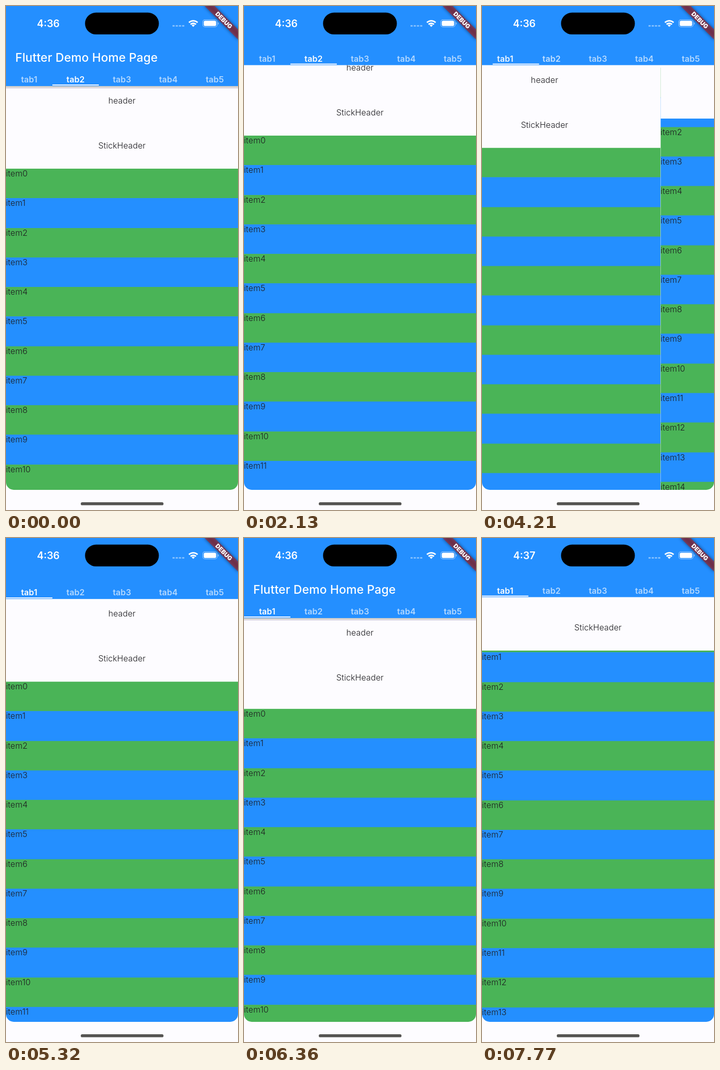
Write an HTML page that moves like this. It is 450 px wide and 976 px high and loops after 7800 ms.

```html
<!DOCTYPE html>
<html lang="en">
<head>
<meta charset="utf-8">
<title>Sticky header tabs</title>
<style>
/* --a, --b: scroll of first and second tab page; --p: page swipe from tab2 (0) to tab1 (1) */
@property --a { syntax: "<number>"; inherits: true; initial-value: 40.5; }
@property --b { syntax: "<number>"; inherits: true; initial-value: 0; }
@property --p { syntax: "<number>"; inherits: true; initial-value: 0; }

html, body { margin: 0; width: 100%; height: 100%; overflow: hidden; background: #fdfcff; }
.stage {
  --c: clamp(0, min(var(--a), var(--b)), 40.5);
  position: relative; width: 450px; height: 976px; overflow: hidden;
  background: #fdfcff; color: #1c1b1f;
  font: 300 16px/18px Inter, sans-serif; letter-spacing: .1px;
  animation: scroll-a 7.8s infinite, scroll-b 7.8s infinite, swipe 7.8s infinite;
}
.stage div, .stage svg { position: absolute; }

@keyframes scroll-b {
  0%, 19.35% { --b: 0; animation-timing-function: cubic-bezier(.44, 0, .6, 1); }
  38.718%, 100% { --b: 195.5; }
}
@keyframes swipe {
  0%, 50.9% { --p: 0; animation-timing-function: cubic-bezier(.3, .1, .3, 1); }
  57.051%, 100% { --p: 1; }
}
@keyframes scroll-a {
  0% { --a: 40.5; animation-timing-function: step-end; }
  68.205% { --a: 37; animation-timing-function: cubic-bezier(.25, .25, .6, 1); }
  75.897% { --a: -46; animation-timing-function: cubic-bezier(.42, 0, .7, .45); }
  81.538% { --a: -16; animation-timing-function: linear; }
  87.564% { --a: 44; animation-timing-function: cubic-bezier(.3, .34, .7, .9); }
  99.615%, 100% { --a: 150.8; }
}

.view { left: 0; top: 0; width: 450px; height: 937px; overflow: hidden; border-radius: 0 0 15px 15px; }
.page { left: 0; top: 0; width: 450px; height: 937px; overflow: hidden; text-align: center; }
.one { --o: var(--a); transform: translateX(calc((var(--p) - 1) * 450px)); }
.two { --o: var(--b); transform: translateX(calc(var(--p) * 450px)); }
.head { top: 174px; width: 450px; transform: translateY(calc(max(0, var(--o)) * -1px)); }
.stick {
  top: 211px; width: 450px; height: 104px; background: #fdfcff; line-height: 118px;
  transform: translateY(calc(clamp(0, var(--o), 97) * -1px));
}
.list { top: 315px; width: 450px; text-align: left; transform: translateY(calc(var(--o) * -1px)); }
/* rows overlap slightly so that no gap shows at fractional offsets */
.item { top: calc(var(--i) * 57.27px); width: 450px; height: 59px; background: #248fff; }
.item:nth-child(odd) { background: #4ab457; }

.bar {
  left: 0; top: -45px; width: 450px; height: 199.6px; background: #248fff;
  transform: translateY(calc(var(--c) * -1px));
}
.shade {
  top: 199.6px; width: 450px; height: 5.4px; opacity: calc(1 - var(--c) / 2);
  background: linear-gradient(#c3c6c8, #dcd7d2 45%, #e4e0f2);
}
.title {
  left: 18px; top: 130px; white-space: nowrap; color: #fff;
  font-size: 22.9px; line-height: 30px; font-weight: 500; letter-spacing: .16px;
  opacity: calc(1 - var(--c) / 32);
}
.tab {
  left: calc(var(--i) * 90px); top: 178px; width: 90px; text-align: center;
  font-weight: 600; color: rgb(255 255 255 / calc(.66 + .34 * var(--on, 0)));
}
.tab.first { --on: var(--p); }
.tab.second { --on: calc(1 - var(--p)); }
.mark {
  left: 90px; top: 197px; width: 90px; height: 2.4px; background: #fdfcff;
  transform: translateX(calc(var(--p) * -90px));
}

.clock {
  left: 42px; top: 24px; width: 80px; text-align: center; color: #fff;
  font-size: 19.5px; line-height: 20px; font-weight: 600; letter-spacing: 0;
}
.old { animation: leave 7.8s step-end infinite; }
.new { animation: enter 7.8s step-end infinite; }
@keyframes leave { 0% { opacity: 1; } 93.6%, 100% { opacity: 0; } }
@keyframes enter { 0% { opacity: 0; } 93.6%, 100% { opacity: 1; } }
.chrome { left: 0; top: 0; }
</style>
</head>
<body>
<div class="stage">
  <div class="view">
    <div class="page one"></div>
    <div class="page two"></div>
  </div>
  <div class="bar">
    <div class="shade"></div>
    <div class="title">Flutter Demo Home Page</div>
    <div class="tab first" style="--i:0">tab1</div>
    <div class="tab second" style="--i:1">tab2</div>
    <div class="tab" style="--i:2">tab3</div>
    <div class="tab" style="--i:3">tab4</div>
    <div class="tab" style="--i:4">tab5</div>
    <div class="mark"></div>
  </div>
  <div class="clock old">4:36</div>
  <div class="clock new">4:37</div>
  <svg class="chrome" width="450" height="976" viewBox="0 0 450 976">
    <defs><filter id="soft" x="-20%" y="-60%" width="140%" height="220%"><feGaussianBlur stdDeviation="3"/></filter></defs>
    <rect x="153.3" y="12.8" width="143.2" height="42.2" rx="21.1"/>
    <path d="M323 38.5h23" stroke="#fff" stroke-opacity=".42" stroke-width="3.2" stroke-dasharray="4.2 2"/>
    <g fill="none" stroke="#fff" stroke-width="2.9">
      <path d="M354.8 32a12.2 12.2 0 0 1 16.9 0"/>
      <path d="M358 35.6a7.6 7.6 0 0 1 10.5 0"/>
    </g>
    <path d="M363.2 40.6l-3-3.1a4.3 4.3 0 0 1 6 0z" fill="#fff"/>
    <rect x="381.6" y="26.6" width="28" height="14" rx="4.4" fill="none" stroke="#fff" stroke-opacity=".45" stroke-width="1.2"/>
    <rect x="383.6" y="28.5" width="24" height="10.2" rx="2.8" fill="#fff"/>
    <path d="M411 31.2c2.2.7 2.2 4.1 0 4.8z" fill="#fff" fill-opacity=".5"/>
    <g transform="translate(450 0) rotate(45)">
      <rect x="-45.8" y="32.06" width="91.6" height="13.74" fill-opacity=".5" filter="url(#soft)"/>
      <rect x="-45.8" y="32.06" width="91.6" height="13.74" fill="#b71c1c" fill-opacity=".56"/>
      <text y="43.1" text-anchor="middle" fill="#fff" font-family="Inter, sans-serif" font-size="11.7" font-weight="900" letter-spacing="0">DEBUG</text>
    </g>
    <rect x="145" y="961" width="160.5" height="5.8" rx="2.9" fill="#555452"/>
  </svg>
</div>
<script>
const items = Array.from({ length: 17 }, (_, i) => `<div class="item" style="--i:${i}">item${i}</div>`).join("");
for (const page of document.querySelectorAll(".page")) {
  page.innerHTML = `<div class="head">header</div><div class="list">${items}</div><div class="stick">StickHeader</div>`;
}
</script>
</body>
</html>
```
